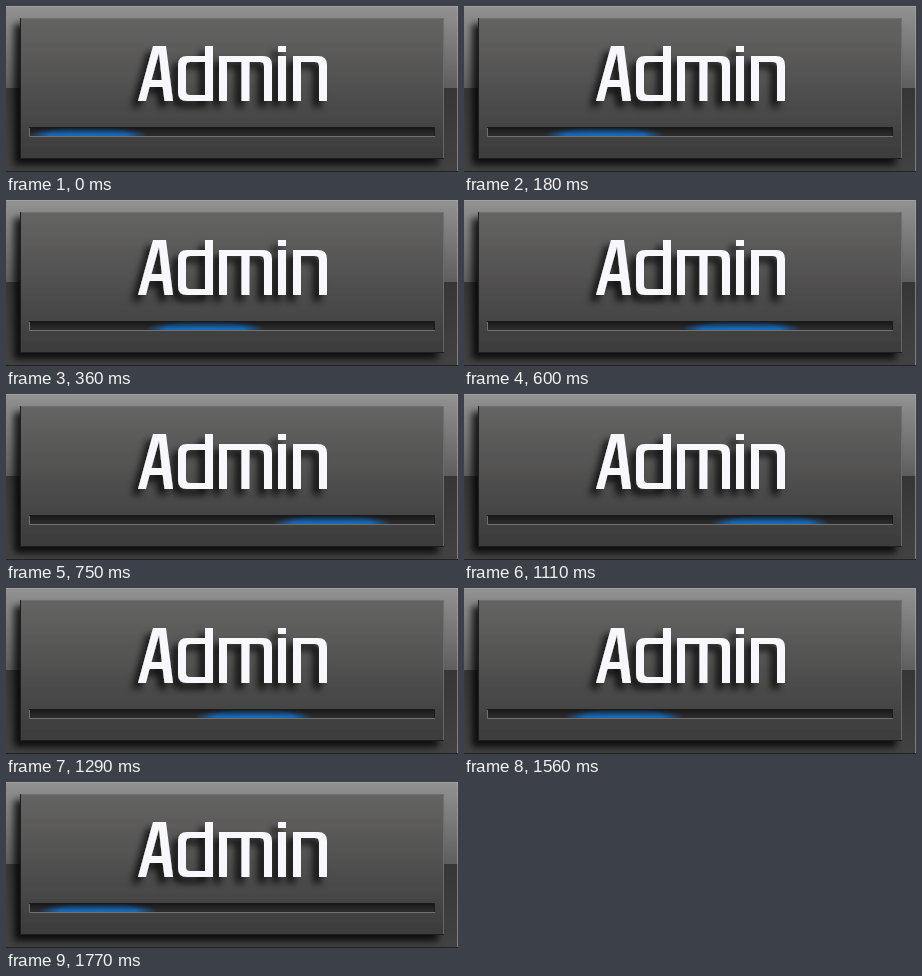
Recreate the animation shown at these times as an HTML page. Size 452 by 166 pixels, loop 1.8 s.

```html
<!DOCTYPE html>
<html lang="en">
<head>
<meta charset="utf-8">
<title>Admin</title>
<style>
  html, body { margin: 0; width: 100%; height: 100%; overflow: hidden; background: #333; }
  svg { display: block; width: 452px; height: 166px; }
</style>
</head>
<body>
<svg viewBox="0 0 452 166" role="img" aria-label="Admin">
  <defs>
    <linearGradient id="gloss" x2="0" y2="1">
      <stop stop-color="#929292"/>
      <stop offset=".494" stop-color="#5e5e5e"/>
      <stop offset=".494" stop-color="#363636"/>
      <stop offset="1" stop-color="#424242"/>
    </linearGradient>
    <linearGradient id="face" x2="0" y2="1">
      <stop stop-color="#656463"/>
      <stop offset="1" stop-color="#3b3b3b"/>
    </linearGradient>
    <linearGradient id="shade" x2="0" y2="1">
      <stop stop-color="#151515" stop-opacity=".85"/>
      <stop offset=".8" stop-color="#151515" stop-opacity="0"/>
    </linearGradient>
    <radialGradient id="blue">
      <stop stop-color="#1769b8"/>
      <stop offset=".65" stop-color="#1769b8" stop-opacity=".95"/>
      <stop offset=".85" stop-color="#1769b8" stop-opacity=".4"/>
      <stop offset="1" stop-color="#1769b8" stop-opacity="0"/>
    </radialGradient>
    <filter id="soft" x="-20%" y="-30%" width="140%" height="160%">
      <feDropShadow dx="-6" dy="6" stdDeviation="3.5" flood-color="#000" flood-opacity=".8"/>
    </filter>
    <clipPath id="slot"><path d="M24 122h404v8H24z"/></clipPath>
  </defs>

  <path fill="url(#gloss)" d="M0 0h452v166H0z"/>
  <path fill="none" stroke="#222" d="M0 165.5h452"/>
  <path fill="none" stroke="#aaa" stroke-opacity=".6" d="M0 .5h451.500V165"/>

  <path fill="url(#face)" filter="url(#soft)" d="M14 12h424v141H14z"/>
  <path fill="none" stroke="#777" stroke-opacity=".7" d="M15 12.5H437.500V152"/>
  <path fill="none" stroke="#1e1e1e" d="M14.500 12V152.500H438"/>

  <!-- lettering -->
  <g filter="url(#soft)" fill="#f8f8fc">
    <path fill-rule="evenodd" d="M132 95 147 40H160L167 95H158.500L156.700 81H143.500L140 95ZM145.500 74H155.800L153 47Z"/>
    <path fill-rule="evenodd" d="M199 40h8V95H181q-9 0-9-9V59q0-9 9-9h18ZM199 56H184q-4 0-4 4v25q0 4 4 4h15Z"/>
    <path d="M213 95V50h44q9 0 9 9v36h-8V60q0-4-4-4h-10.500v39h-8V56H221v39Z"/>
    <path d="M272 40h8v6H272ZM272 50h8v45H272Z"/>
    <path d="M287 95V50h25q9 0 9 9v36h-8V60q0-4-4-4h-14v39Z"/>
  </g>

  <path fill="#2b2b2b" d="M23 121h406v10H23z"/>
  <g clip-path="url(#slot)">
    <ellipse id="glow" cy="129" rx="59" ry="11" fill="url(#blue)"/>
    <path fill="url(#shade)" d="M24 122h404v8H24z"/>
  </g>
  <path fill="none" stroke="#1a1a1a" d="M23 121.500H428.500V131"/>
  <path fill="none" stroke="#707070" d="M23.500 122V130.500H429"/>
</svg>
<script>
  const glow = document.getElementById('glow');
  const LOOP = 1800, STEP = 30, LEFT = 82, TRAVEL = 293;

  function draw(now) {
    const t = Math.floor((now % LOOP) / STEP) * STEP;
    const sweep = 1 - Math.abs(t / (LOOP / 2) - 1);
    glow.setAttribute('cx', LEFT + TRAVEL * sweep);
  }

  function tick() {
    draw(performance.now());
    requestAnimationFrame(tick);
  }
  tick();
</script>
</body>
</html>
```
